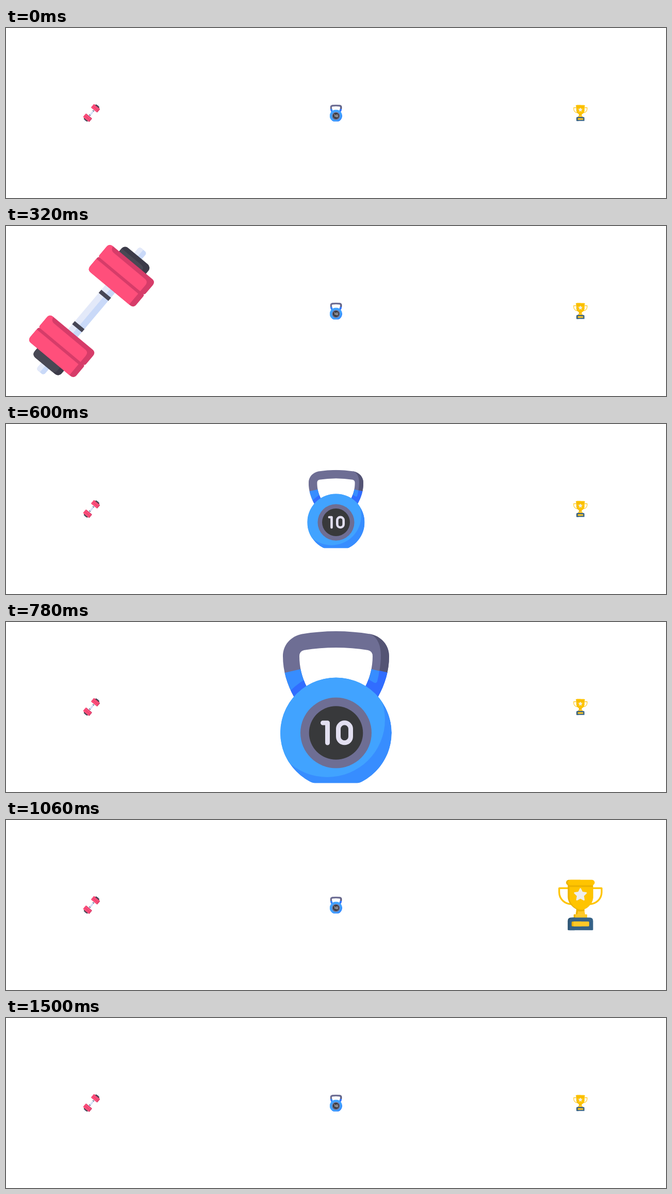
Write an HTML page that moves like this. It is 1280x332 px and loops after 1.52 s.

```html
<!DOCTYPE html>
<html lang="en">
<head>
<meta charset="utf-8">
<title>Fitness icons</title>
<style>
  html, body { margin: 0; width: 100%; height: 100%; overflow: hidden; background: #fff; }
  svg { display: block; width: 100%; height: 100%; }
</style>
</head>
<body>
<svg viewBox="0 0 1280 332">
  <defs>
    <clipPath id="ball"><path d="M598 314C593 314 532 286 532 216.500A108 108 0 0 1 748 216.500C748 286 687 314 682 314Z"/></clipPath>
    <clipPath id="bell"><path d="M599 314.500Q595 314.500 591 312.800A108 108 0 1 1 689 312.800Q685 314.500 681 314.500Z"/></clipPath>
    <clipPath id="grip"><path d="M559 147C545 122 537 95 537 67C537 45 552 28 574 23.500Q640 12.500 706 23.500C728 28 743 45 743 67C743 95 735 122 721 147L697 126C706 108 711 88 711 67Q711 57 702 55Q640 45 578 55Q569 57 569 67C569 88 574 108 583 126Z"/></clipPath>
    <g id="plates">
      <path fill="#d63c69" d="M-49.500-123.500H49.500Q58.500-123.500 58.500-114.500V-94Q58.500-90 55-90Q58.500-90 58.500-86V-65.500Q58.500-56.500 49.500-56.500H-49.500Q-58.500-56.500-58.500-65.500V-86Q-58.500-90-55-90Q-58.500-90-58.500-94V-114.500Q-58.500-123.500-49.500-123.500Z"/>
      <g fill="#ff4f7b">
        <path d="M-55-90Q-58.500-90-58.500-94V-114.500Q-58.500-123.500-49.500-123.500Q-48-114.500-40-114.500H38.500Q47.500-114.500 47.500-105.500V-90Z"/>
        <path d="M-58.500-84H47.500V-56.500H-49.500Q-58.500-56.500-58.500-65.500Z"/>
      </g>
    </g>
  </defs>

  <g id="dumbbell">
    <g transform="translate(166 166) rotate(40)">
      <rect x="-9.500" y="-156" width="19" height="312" rx="5" fill="#c9d9f8"/>
      <path fill="#e3e9f9" d="M0-156H-4.500Q-9.500-156-9.500-151V151Q-9.500 156-4.500 156H0Z"/>
      <path fill="#c9d9f8" d="M0-60H12V60H0Z"/>
      <path fill="#e3e9f9" d="M-12-60H0V60H-12Z"/>
      <path fill="#464655" d="M-12.300-44H12.300V-36H-12.300ZM-12.300 36H12.300V44H-12.300Z"/>
      <rect x="-34" y="-140" width="68" height="30" rx="9" fill="#3c3b49"/>
      <path fill="#484854" d="M-34-131H16Q24-131 24-123V-110H-34Z"/>
      <rect x="-34" y="110" width="68" height="30" rx="9" fill="#3c3b49"/>
      <path fill="#484854" d="M-34 110H24V131Q24 140 16 140H-25Q-34 140-34 131Z"/>
      <use href="#plates"/>
      <use href="#plates" y="180"/>
    </g>
  </g>

  <g id="kettlebell">
    <g clip-path="url(#grip)">
      <path fill="#6e6e94" d="M530 10H750V150H530Z"/>
      <path fill="#545474" d="M704 10V23C719 27 727 44 727 65Q727 80 724 97L750 110V10Z"/>
      <path fill="#378dff" d="M530 101.500L580 90V160H530ZM700 90L750 101.500V160H690Z"/>
      <path fill="#316dff" d="M540 147Q558 124 585 109V160H540ZM724 95Q723 105 720 116Q718 121 713 118L698 109L690 160H760V103Z"/>
    </g>
    <g clip-path="url(#bell)">
      <circle cx="640" cy="216.500" r="108" fill="#378dff"/>
      <circle cx="623" cy="191" r="112" fill="#41a3ff"/>
    </g>
    <circle cx="640" cy="216.500" r="69" fill="#6e6e94"/>
    <circle cx="640" cy="216.500" r="52.300" fill="#38393b"/>
    <g fill="none" stroke="#e2dff0" stroke-width="9" stroke-linecap="round" stroke-linejoin="round" aria-label="10">
      <path d="M614.500 197H623.500V236"/>
      <rect x="644.500" y="196.800" width="24" height="39" rx="12"/>
    </g>
  </g>

  <g id="trophy">
    <path fill="none" stroke="#ffc400" stroke-width="10" stroke-linejoin="round"
      d="M1045 66H988.500V90C988.500 130 1020 160 1062 161M1183 66H1239.500V90C1239.500 130 1208 160 1166 161"/>
    <path fill="#ffc828" d="M1090 188H1137Q1138 205 1142 223H1086Q1090 205 1090 188Z"/>
    <path fill="#ebb200" d="M1090 185H1137L1138.500 200Q1118 207 1099 202.500Q1098 213 1096 223H1086Q1090 205 1090 185Z"/>
    <path fill="#ebb200" d="M1039 40H1189V118C1189 160 1150 194 1119 194H1095C1066 181 1039 152 1039 118Z"/>
    <path fill="#ffc400" d="M1049 58.500H1189V118C1189 160 1150 194 1119 194C1088 194 1049 160 1049 118Z"/>
    <rect x="1029" y="16" width="100" height="32.500" rx="16.250" fill="#ebb200"/>
    <rect x="1039" y="16" width="159.500" height="32.500" rx="16.250" fill="#ffc400"/>
    <path fill="#eee" stroke="#eee" stroke-width="9" stroke-linejoin="round"
      d="M1114 70L1124 91L1147.500 94.500L1130.500 111L1134.500 134.500L1114 123L1093.500 134.500L1097.500 111L1080.500 94.500L1104 91Z"/>
    <path fill="#ffc828" d="M1080 221.500H1150Q1154 221.500 1154 225.500V243H1080Z"/>
    <path fill="#ebb200" d="M1084 221.500H1078Q1074 221.500 1074 225.500V243H1084Z"/>
    <path fill="#2a5272" d="M1059 241H1080V316.500H1043Q1039 316.500 1039 312.500V261Q1039 241 1059 241Z"/>
    <path fill="#356287" d="M1069 241H1169Q1189 241 1189 261V312.500Q1189 316.500 1185 316.500H1049V261Q1049 241 1069 241Z"/>
    <rect x="1062" y="264.500" width="60" height="28.500" rx="5" fill="#ebb200"/>
    <rect x="1072" y="264.500" width="94" height="28.500" rx="5" fill="#ffc828"/>
  </g>
</svg>
<script>
  const LOOP = 1520, TICK = 20, TURN = 500, CENTER_Y = 166;

  // drawnAt: the scale at which each icon's coordinates are written
  const icons = [
    { id: 'dumbbell', x: 166, drawnAt: 0.748 },
    { id: 'kettlebell', x: 640, drawnAt: 0.892 },
    { id: 'trophy', x: 1114, drawnAt: 0.964 },
  ].map(icon => ({ ...icon, node: document.getElementById(icon.id) }));

  // Each icon in turn grows linearly from 0.1 to 1 and back.
  const pulse = t => 0.1 + 0.9 * Math.max(0, 1 - Math.abs(2 * t / TURN - 1));

  function draw() {
    const t = Math.floor(performance.now() % LOOP / TICK) * TICK;
    icons.forEach(({ node, x, drawnAt }, i) => {
      const scale = pulse(t - i * TURN) / drawnAt;
      node.setAttribute('transform',
        `translate(${x} ${CENTER_Y}) scale(${scale}) translate(${-x} ${-CENTER_Y})`);
    });
    requestAnimationFrame(draw);
  }
  draw();
</script>
</body>
</html>
```
